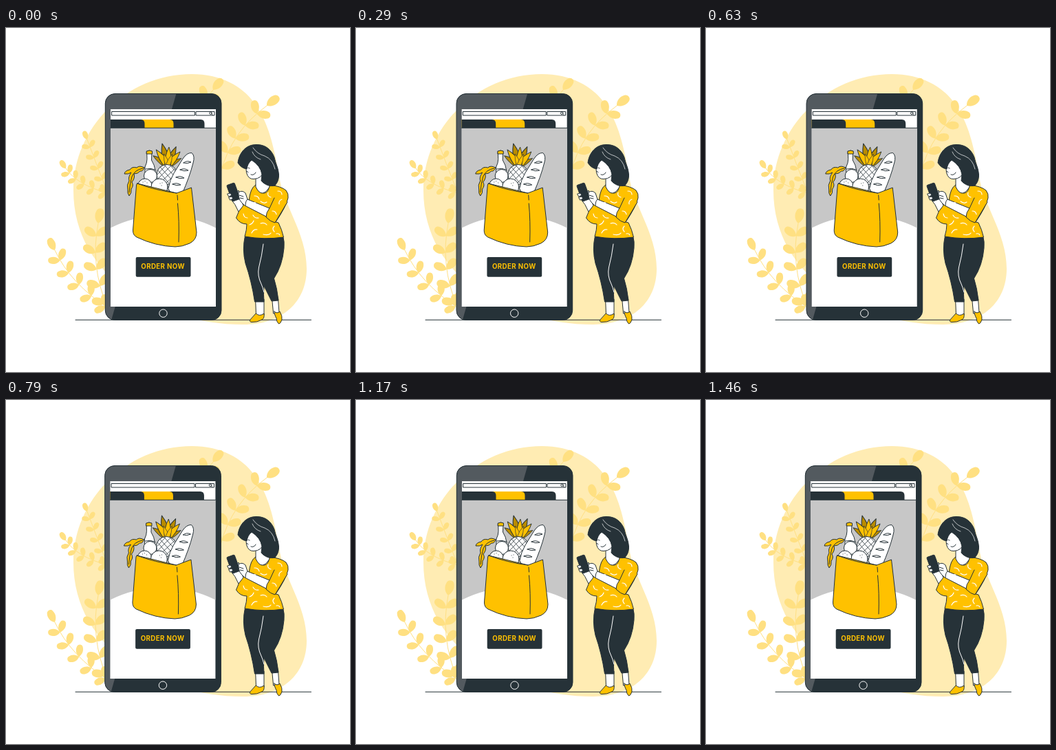
Write an HTML page that moves like this. It is 500x500 px and loops after 1500 ms.

```html
<!DOCTYPE html>
<html lang="en">
<head>
<meta charset="utf-8">
<title>Order now</title>
<style>
  html, body { margin: 0; width: 100%; height: 100%; overflow: hidden; background: #fff; }
  svg { display: block; width: 100%; height: 100%; }
  .line { stroke: #263238; stroke-width: 1; stroke-linecap: round; stroke-linejoin: round; }
  .none { fill: none; }
  .white { fill: #fff; }
  .dark { fill: #263238; }
  .gold { fill: #ffc100; }
  .ochre { fill: #b98c00; }
</style>
</head>
<body>
<svg viewBox="0 0 500 500">
  <defs><path id="frond" d="M-5 0Q-6 -16 0 -30Q6 -16 5 0"/></defs>
  <path fill="#ffecb3" d="M270 67C312 67 343 84 361 109C382 138 389 172 396 210C402 258 437 297 437 350C437 398 402 431 345 431C280 431 225 412 180 385C130 350 98 300 98 236C98 145 175 67 270 67Z"/>
  <g id="plants" fill="#ffe082" stroke="#ffe082"></g>
  <path class="line none" d="M101 424.3H443.5"/>

  <g id="phone">
    <clipPath id="body"><rect x="144.3" y="95.5" width="168.7" height="329" rx="14"/></clipPath>
    <g clip-path="url(#body)">
      <path class="dark" d="M140 90H320V430H140Z"/>
      <path fill="#535a5f" d="M140 90H249L153 425H140Z"/>
    </g>
    <rect class="line none" x="144.3" y="95.5" width="168.7" height="329" rx="14"/>
    <path class="white" d="M152 118H305V405H152Z"/>
    <path fill="#c7c7c7" d="M152 145H305V290.500A171 171 0 0 0 152 290.500Z"/>
    <path class="dark" d="M152 133H283Q288.500 133 288.500 139V145H152Z"/>
    <path class="gold" d="M152 133H238Q243.500 133 243.500 139V145H152Z"/>
    <path class="dark" d="M152 133H196Q201.500 133 201.500 139V145H152Z"/>
    <g class="line none">
      <path d="M152 145.300H305M154 121.500H274.500V127H154ZM276.500 121.500H303V127H276.500Z"/>
      <circle cx="297.500" cy="123.800" r="1.700"/><path d="M299 125.200L300.500 126.500"/>
    </g>

    <g class="line">
      <g class="ochre" transform="translate(235 200)">
        <use href="#frond" transform="rotate(-56) scale(.85)"/>
        <use href="#frond" transform="rotate(-14) scale(1.1)"/>
        <use href="#frond" transform="rotate(24)"/>
        <use href="#frond" transform="rotate(62) scale(.75)"/>
      </g>
      <g class="gold" transform="translate(235 200)">
        <use href="#frond" transform="rotate(-36) scale(.95)"/>
        <use href="#frond" transform="rotate(42) scale(.9)"/>
        <use href="#frond" transform="rotate(4) scale(.9)"/>
        <use href="#frond" transform="rotate(-18) scale(.6)"/>
        <use href="#frond" transform="rotate(22) scale(.6)"/>
      </g>
      <ellipse class="white" cx="234" cy="213" rx="15" ry="14.500"/>
      <path class="none" stroke-width=".8" d="M221 207L237 226M224 202L243 223M230 199L247 218M239 200L248 210M220 213L232 200M221 219L240 200M225 224L245 205M232 226L248 211"/>
      <path class="white" d="M205 179Q208.500 177 212 179L211.500 192Q216 199 217 207V228H202V202Q205 196 205 191Z"/>
      <path class="gold" d="M204.500 179Q208.500 177 212.500 179V183H204.500Z"/>
      <path class="none" d="M203 205Q210 203 217 206"/>
      <path class="gold" d="M201 203Q194 199 190 203Q183 201 180 206Q173 207 172 212Q178 213 182 210Q177 217 179 222Q175 228 177 235Q176 240 179 244Q183 240 182 234Q186 229 183 224Q188 218 186 212Q192 212 195 208Q199 209 201 203Z"/>
      <path class="none" d="M199 204Q187 206 183 216Q180 226 179 239"/>
      <circle class="white" cx="210" cy="215" r="9.500"/>
      <circle class="white" cx="202" cy="229" r="10"/>
      <circle class="white" cx="223" cy="231" r="12"/>
      <path class="none" d="M199 224h.1M202 222.500h.1M205 225h.1M224 226h.1M227 225h.1M226 229h.1"/>
      <path class="white" d="M236 233Q238 221 244 211L257 190Q263 181 270 181.500Q275 186 272 196Q267 216 256 241H240Z"/>
      <path class="none" d="M258 196Q263 192 269 195Q263 198 258 196M253 206Q259 203 265 207Q259 209 253 206M247 217Q253 214 259 218Q253 220 247 217M242 227Q248 224 254 228Q248 230 242 227"/>
      <path class="gold" d="M191 226L248 240L269.500 232L277 297Q277 308 267 313Q256 318 246 318Q217 317 190 304Q184.300 301 184.500 294L189.500 229Q189.500 226 191 226Z"/>
      <path class="none" d="M191 226Q217 236 248 240M249 243L249.500 250M249.500 255Q252 280 251 311"/>
    </g>

    <rect class="dark" x="188.700" y="333" width="79.800" height="28.800" rx="2"/>
    <text class="gold" x="196.300" y="350.400" font-family="Inter, sans-serif" font-weight="700" font-size="9.700" letter-spacing=".4">ORDER NOW</text>
    <circle fill="none" stroke="#fff" cx="228.500" cy="414.700" r="5.700"/>
  </g>

  <g class="line">
    <path class="white" d="M363 394H375V417L364 420ZM387 393H395.500L397 414L389 415Z"/>
    <path class="gold" d="M363.500 415Q368 420 375 415Q376 422 372 424Q365 428 357 427.500Q353 427 355 424Z"/>
    <path class="gold" d="M390 412Q394 416 398 412Q402 419 401 424Q399 430 396.500 430Q393 427 393 422Q390 417 390 412Z"/>
    <path class="dark" d="M347.500 302Q343 322 348 342Q357 368 361.500 398H375Q374 388 375 375L386 397L396 396Q394 378 389.500 364Q402 345 404 320Q405 310 402.500 302Z"/>
    <path fill="none" stroke="#fff" d="M374 314Q372 331 367.500 348Q365 360 371 372Q373 376 375 384"/>

    <path class="gold" d="M363 228Q366 241 376 240Q382 238 383 228Q400 230 407 236Q411 241 410 247Q407 260 392 282L396 283Q401 293 403.500 304Q375 308 347 303Q350 293 350 285Q340 285 334.500 276L342 258L353 252Q355 232 363 228Z"/>
    <path class="white" d="M363 214V231Q372 249 383 231L380 212Z"/>
    <path class="white" d="M351 192Q348 202 349.500 210Q352 220 360 219.500Q372 219 374 208L370 190Z"/>
    <path class="dark" d="M364 169.500C350 169 339 180 337 196Q342 204 350 205Q351 197 357 192Q370 200 372 213L371 222C376 228 384 231 391 229Q397 222 396.500 213C396 203 392 198 390 188C386 177 377 169 364 169.500Z"/>
    <path fill="none" stroke="#fff" stroke-width=".7" d="M359 174Q365 183 376 186Q388 191 391 205M358 180Q361 188 370 191"/>
    <path class="none" d="M352 203l2 1M350 208l2 2M356 213Q360 215 363 210"/>

    <path class="white" d="M327 249L338 236L342 251L345 258L338 267Q333 255 327 249Z"/>
    <rect class="dark" x="-6" y="-12.500" width="12" height="25" rx="2" transform="translate(330.500 238.500) rotate(-20)"/>
    <path class="white" d="M322 241l4-1 2 3-4 2ZM324 246l4-1 2 3-4 2ZM338 239Q343 235 348 240L351 249L383 262L378 274L347 258Q338 251 338 243Z"/>
    <path class="none" d="M339 243l6 2M340 247l5 1M348 258Q348 251 351 249"/>
    <path class="gold" d="M390 247L383 262Q378 268 378 275Q385 282 391 283L409 253"/>
    <path fill="none" stroke="#fff" stroke-width="1.200" d="M361 244q6 0 7 5M381 239q-2 5 4 7M395 237q6 0 6 5M355 258q3-6 8-4M370 252q5 4 9 1M401 249q-5 2-4 7M387 266q5 0 6 5M345 270q1 6 6 6M359 272q3 5 8 4M354 286q5-2 6-6M370 284q6-2 9 2M390 288q-4 4 0 8M357 298q3-6 8-5M374 300q8 2 11-2M393 299q4-1 5 2"/>
  </g>
</svg>
<script>
const plants = document.getElementById("plants");
const phone = document.getElementById("phone");

function leaf(x, y, angle, size) {
  return `<path stroke="none" transform="translate(${x} ${y}) rotate(${angle}) scale(${size})"
    d="M0 0C.15-.25.5-.4.85-.25C1.05-.15 1.05.15.85.22C.5.36.2.22 0 0Z"/>`;
}

// Quadratic stem from base to tip, with leaves in pairs and one at the end.
function branch(x0, y0, cx, cy, x1, y1, pairs, size) {
  let shapes = `<path fill="none" d="M${x0} ${y0}Q${cx} ${cy} ${x1} ${y1}"/>`;
  for (let i = 1; i <= pairs; i++) {
    const t = (i - 0.75) / pairs, s = 1 - t;
    const x = s * s * x0 + 2 * s * t * cx + t * t * x1;
    const y = s * s * y0 + 2 * s * t * cy + t * t * y1;
    const dx = s * (cx - x0) + t * (x1 - cx), dy = s * (cy - y0) + t * (y1 - cy);
    const angle = Math.atan2(dy, dx) * 180 / Math.PI;
    shapes += leaf(x, y, angle - 60, size) + leaf(x, y, angle + 50, size);
  }
  const end = Math.atan2(y1 - cy, x1 - cx) * 180 / Math.PI;
  plants.innerHTML += shapes + leaf(x1, y1, end, size * 1.1);
}

branch(148, 240, 132, 200, 118, 162, 5, 12);
branch(148, 240, 103, 228, 87, 204, 5, 12.5);
branch(147, 405, 122, 345, 134, 284, 5, 20);
branch(150, 408, 94, 372, 71, 323, 5, 17.5);
branch(312, 210, 328, 150, 379, 113, 5, 20);
branch(275, 125, 288, 105, 301, 90, 2, 19);

const shake = [0, -1, 1.7, -4, 4, -4, 4, -4, 2, -1, 0];
const start = performance.now();

function draw(now) {
  const step = Math.floor((Math.max(0, now - start) % 1500 + 5) * 36 / 1500) % 36;
  const pos = step / 35 * 10, i = Math.min(9, Math.floor(pos));
  const x = shake[i] + (shake[i + 1] - shake[i]) * (pos - i);
  phone.setAttribute("transform", `translate(${x} 0)`);
  requestAnimationFrame(draw);
}
draw(start);
</script>
</body>
</html>
```
